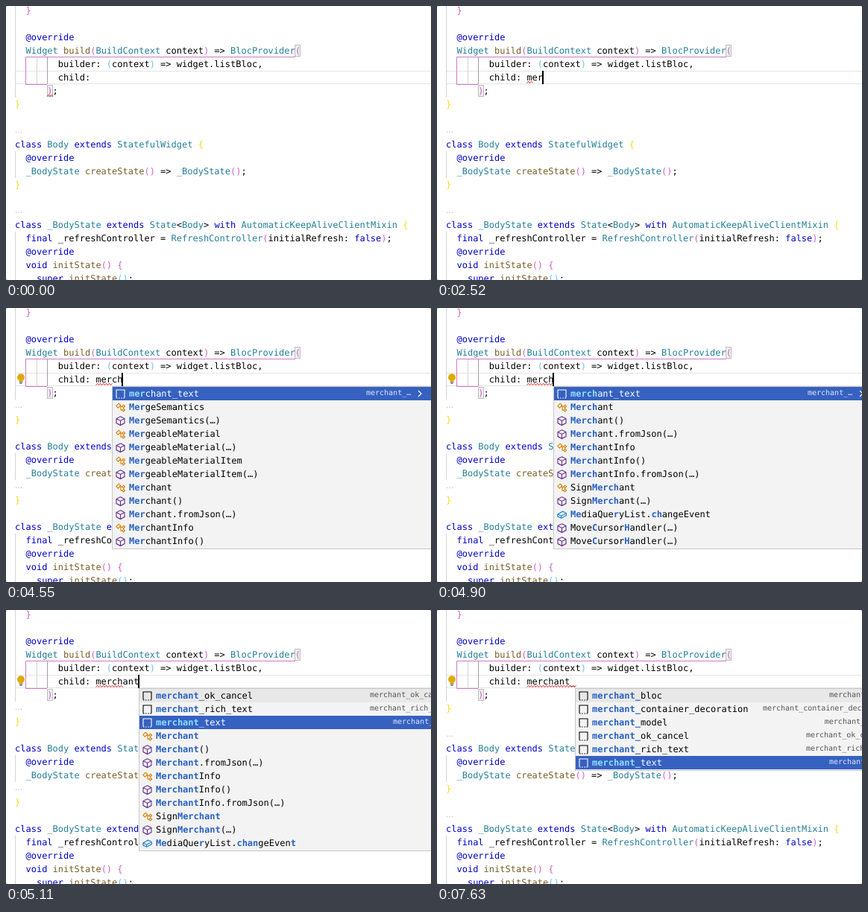
These frames come from a looping animation (570 by 368 pixels, 8 s). An HTML page:

```html
<!DOCTYPE html>
<html lang="en">
<head>
<meta charset="utf-8">
<title>Code completion</title>
<style>
  html, body { margin: 0; width: 100%; height: 100%; overflow: hidden; background: #ccc; }
  #stage {
    position: relative; width: 570px; height: 368px; overflow: hidden;
    background: #fff; border-radius: 4px; color: #000;
    font: 12px/18px "DejaVu Sans Mono", monospace; text-rendering: geometricPrecision;
  }
  #stage div, #stage > svg { position: absolute; white-space: pre; }
  svg { fill: none; overflow: visible; }
  .kw { color: #0000c8; }
  .type { color: #267f99; }
  .fn { color: #795e26; }
  .b0 { color: #f2dc1c; }
  .b1 { color: #cf5fcb; }
  .b2 { color: #6cc3e6; }
  .lens { left: 12px; color: #b4b4b4; font: 10px/18px "DejaVu Sans", sans-serif; }
  .line { left: 12px; right: 0; top: 87px; height: 16px; border: solid #e4e4e4; border-width: 1px 0; }
  .pair { width: 6px; height: 14px; border: 1px solid #bdbdbd; background: #f0f0f0; }
  .caret { top: 87px; width: 2px; height: 18px; background: #000; }
  .popup { top: 105px; width: 428px; border: 1px solid #c8c8c8; background: #f3f3f3; padding-bottom: 1px; }
  #stage .row { position: relative; height: 18px; }
  .row svg { position: absolute; left: 4px; top: 3px; stroke-width: 1.1; }
  .row .label { left: 22px; }
  .row .info { color: #555; font-size: 10px; }
  .row b { color: #2860c0; }
  .row.hover { background: #e8e8e8; }
  .row.on { background: #3661c0; color: #fff; }
  .row.on b { color: #8fe0ff; }
  .row.on .info { color: #e0e8fa; }
</style>
</head>
<body>
<div id="stage"></div>
<script>
const CHAR = 7.224, LEFT = 12, LOOP = 8000;
const stage = document.getElementById('stage');
const colX = col => LEFT + col * CHAR;
const rowY = row => row * 18 - 3;

function add(cls, x, y, html = '', parent = stage) {
  const el = document.createElement('div');
  el.className = cls;
  if (x !== null) el.style.left = x + 'px';
  if (y !== null) el.style.top = y + 'px';
  el.innerHTML = html;
  parent.append(el);
  return el;
}
const show = (el, on) => { el.style.visibility = on ? 'visible' : 'hidden'; };

// Editor text
const code = [
  '  }', '', '  @override',
  '  Widget build(BuildContext context) => BlocProvider(',
  '        builder: (context) => widget.listBloc,',
  '        child: ', '      );', '}', '', '',
  'class Body extends StatefulWidget {', '  @override',
  '  _BodyState createState() => _BodyState();', '}', '', '',
  'class _BodyState extends State<Body> with AutomaticKeepAliveClientMixin {',
  '  final _refreshController = RefreshController(initialRefresh: false);',
  '  @override', '  void initState() {', '    super.initState();'
];
const token = /(@override|\b(?:class|extends|with|final|void|super|false)\b)|(\b_?[A-Z]\w*)|(\b(?:build|createState|initState)\b)|([({])|([)}])|[<>]/g;
let depth = 2;
const span = (cls, s) => `<span class="${cls}">${s}</span>`;
const paint = text => text.replace(token, (s, kw, type, fn, open, close) => {
  if (kw) return span('kw', s);
  if (type) return span('type', s);
  if (fn) return span('fn', s);
  if (open) return span('b' + depth++, s);
  if (close) return span('b' + --depth, s);
  return s === '<' ? '&lt;' : '&gt;';
});

add('line');
stage.insertAdjacentHTML('beforeend', `<svg width="570" height="368" style="left:0;top:0">
  <path stroke="#d4d4d4" d="M12.5 0V123M12.5 195V231M12.5 303V368M41.5 69V105"/>
  <path stroke="#a89aa8" d="M55.5 69V105"/>
  <path stroke="#cf78cb" d="M388 68.5H26.5V105.5H55"/>
</svg>`);
add('pair', 387, 52);
add('pair', 55, 106);

const lines = code.map((text, i) => add('', LEFT, rowY(i), paint(text)));
const lenses = [9, 15].map(row => add('lens', null, rowY(row), '…'));
const typed = add('', colX(15), rowY(5));

stage.insertAdjacentHTML('beforeend', `<svg width="570" height="368" style="left:0;top:0">
  <path id="wordWave" stroke="#e01818"/><path id="endWave" stroke="#e01818"/>
  <g id="bulb"><path fill="#ddab00" d="M20 88.2a4.8 4.8 0 0 0-2.6 8.9v1.6h5.2v-1.6a4.8 4.8 0 0 0-2.6-8.9z"/>
  <path stroke="#777" stroke-width="1.2" d="M17.8 99.6h4.4M18.3 101.3h3.4"/></g>
</svg>`);
const [wordWave, endWave, bulb] = ['wordWave', 'endWave', 'bulb'].map(id => document.getElementById(id));

function wave(x, y, chars) {
  let d = `M${x} ${y}`;
  for (let i = 1; i * 2 <= chars * CHAR + 1; i++) d += `L${x + i * 2} ${y - (i % 2) * 2.2}`;
  return d;
}
endWave.setAttribute('d', wave(55, 121.5, 1));
const caret = add('caret');

// Completion lists: kind letter, then the label with matches between stars
const icons = {
  s: ['currentColor', 'M1 11.5V1H12V11.5M1 12H2.5M4 12H5.5M7.5 12H9M10.5 12H12'],
  c: ['#d67e00', 'M.8 4.6L4.2 1.2L6.8 3.8L3.4 7.2ZM5.5 5.2H9M7 5.2V10.2H9M8.8 5.2L10.8 3.2L12.6 5L10.6 7ZM8.8 10.2L10.8 8.2L12.6 10L10.6 12Z'],
  m: ['#652d90', 'M6.5 .8L12 3.6V9.6L6.5 12.6L1 9.6V3.6ZM1 3.6L6.5 6.5L12 3.6M6.5 6.5V12.6'],
  e: ['#1080cc', 'M.8 6L7.6 2.2L12.4 4.6V7.6L5.6 11.2L.8 8.8ZM.8 6L5.6 8.2L12.4 4.6M5.6 8.2V11.2']
};
const icon = kind => `<svg width="13" height="13"><path stroke="${icons[kind][0]}" d="${icons[kind][1]}"/></svg>`;

function popup(chars, selected, items) {
  const box = add('popup', Math.floor(colX(15 + chars)), null);
  items.forEach((item, i) => {
    const on = i === selected;
    const label = item.slice(1);
    const plain = label.replace(/\*/g, '');
    const row = add('row' + (on ? ' on' : i === 0 ? ' hover' : ''), null, null, icon(item[0]), box);
    add('label', null, null, label.replace(/\*(.+?)\*/g, '<b>$1</b>'), row);
    if (item[0] !== 's') return;
    const cut = on ? 'merchant_…' : plain;
    add('info', Math.max(252, 421.6 - 6.2 * plain.length) - 1, 0, cut, row);
    if (on) row.insertAdjacentHTML('beforeend',
      '<svg width="6" height="10" style="left:409px;top:4px"><path stroke="#fff" d="M1 1L5 5L1 9"/></svg>');
  });
  return box;
}

const popups = [
  popup(3, 0, ['s*mer*chant_text', 'c*Mer*geSemantics', 'm*Mer*geSemantics(…)', 'c*Mer*geableMaterial',
    'm*Mer*geableMaterial(…)', 'c*Mer*geableMaterialItem', 'm*Mer*geableMaterialItem(…)', 'c*Mer*chant',
    'm*Mer*chant()', 'm*Mer*chant.fromJson(…)', 'c*Mer*chantInfo', 'm*Mer*chantInfo()']),
  popup(5, 0, ['s*merch*ant_text', 'c*Merch*ant', 'm*Merch*ant()', 'm*Merch*ant.fromJson(…)',
    'c*Merch*antInfo', 'm*Merch*antInfo()', 'm*Merch*antInfo.fromJson(…)', 'cSign*Merch*ant',
    'mSign*Merch*ant(…)', 'e*Me*diaQue*r*yList.*ch*angeEvent',
    'mMove*C*ursor*H*andler(…)', 'mMove*C*ursor*H*andler(…)']),
  popup(8, 2, ['s*merchant*_ok_cancel', 's*merchant*_rich_text', 's*merchant*_text', 'c*Merchant*',
    'm*Merchant*()', 'm*Merchant*.fromJson(…)', 'c*Merchant*Info', 'm*Merchant*Info()',
    'm*Merchant*Info.fromJson(…)', 'cSign*Merchant*', 'mSign*Merchant*(…)',
    'e*Me*diaQue*r*yList.*chan*geEven*t*']),
  popup(9, 5, ['s*merchant_*bloc', 's*merchant_*container_decoration', 's*merchant_*model',
    's*merchant_*ok_cancel', 's*merchant_*rich_text', 's*merchant_*text'])
];

// Each track lists [time, value] steps
const tracks = {
  chars: [[0, 0], [1820, 1], [2450, 2], [2520, 3], [4060, 4], [4130, 5], [4970, 6], [5040, 7], [5110, 8], [7140, 9]],
  caret: [[0, 0], [630, 1], [1120, 0], [1680, 1], [3010, 0], [3500, 1], [5600, 0], [6160, 1], [6650, 0], [7140, 1], [7560, 0]],
  wave: [[0, 0], [1960, 1], [3150, 3], [4690, 5], [5250, 8], [7560, 9]],
  list: [[0, -1], [2940, 0], [4690, 1], [5110, 2], [7210, 3]],
  shifted: [[0, 0], [4550, 1], [5530, 0]],
  bulb: [[0, 0], [4550, 1]]
};
const valueAt = (steps, t) => steps.findLast(([at]) => at <= t)[1];

function draw(t) {
  const now = {};
  for (const name in tracks) now[name] = valueAt(tracks[name], t);
  typed.textContent = 'merchant_'.slice(0, now.chars);
  caret.style.left = Math.round(colX(15 + now.chars)) - 1 + 'px';
  show(caret, now.caret);
  wordWave.setAttribute('d', now.wave ? wave(120.5, 103.5, now.wave) : '');
  show(endWave, now.chars === 0);
  show(bulb, now.bulb);
  [7, 13].forEach((row, i) => {
    lines[row].style.top = rowY(row + now.shifted) + 'px';
    lenses[i].style.top = rowY(now.shifted ? row : row + 2) + 'px';
  });
  popups.forEach((box, i) => show(box, i === now.list));
}

const start = performance.now();
function tick() {
  draw((performance.now() - start) % LOOP);
  requestAnimationFrame(tick);
}
tick();
</script>
</body>
</html>
```
